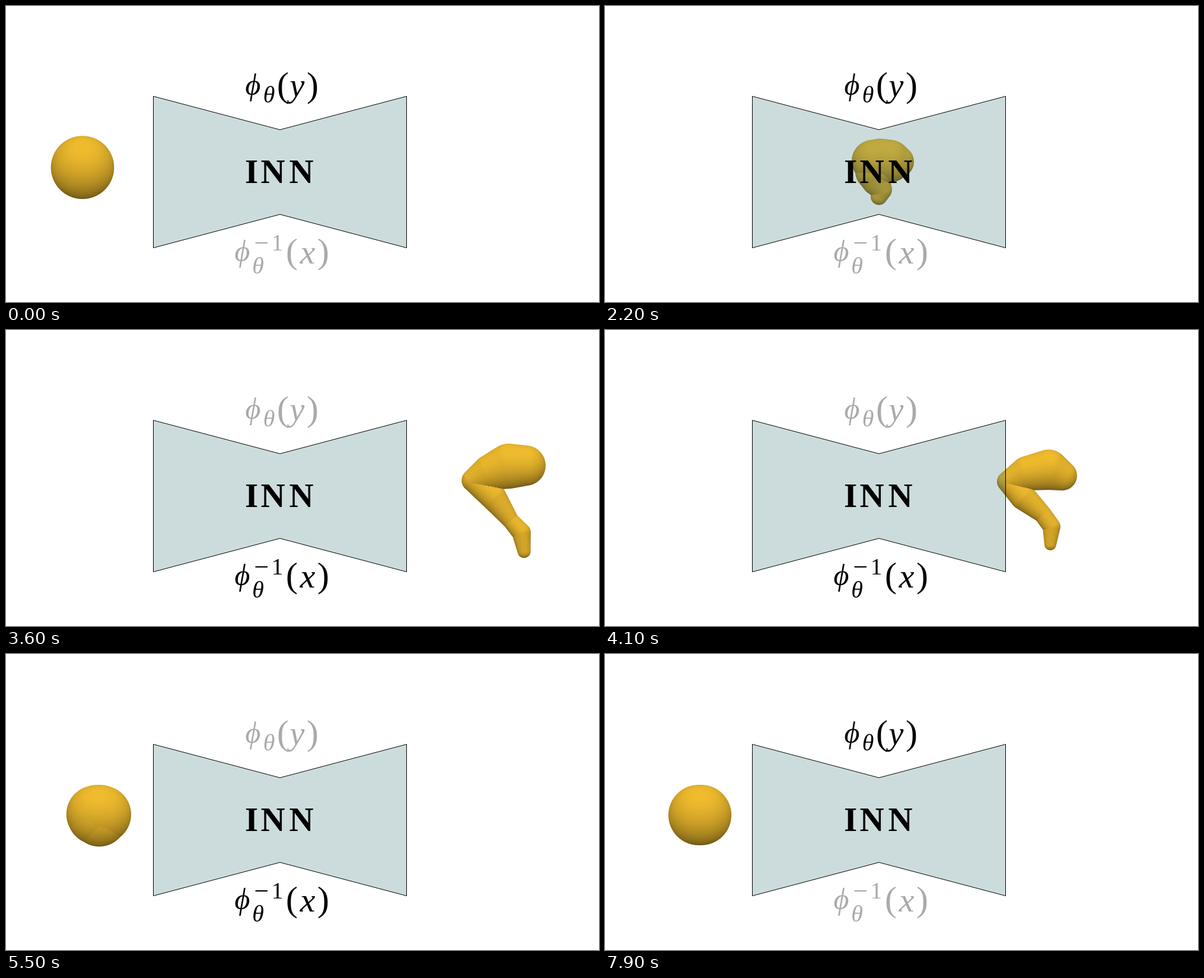
An HTML page with a canvas that plays this animation: 1000 px wide and 500 px high, repeating every 8000 ms.

```html
<!DOCTYPE html>
<html lang="en">
<head>
<meta charset="utf-8">
<title>Invertible network</title>
<style>
  html, body { margin: 0; width: 100%; height: 100%; overflow: hidden; background: #fff; }
  canvas, svg { position: absolute; left: 0; top: 0; width: 1000px; height: 500px; }
  text { font-family: "Liberation Serif", "DejaVu Serif", serif; text-anchor: middle; }
  .it { font-style: italic; }
  .name { font-weight: bold; font-size: 57px; }
</style>
</head>
<body>
<canvas id="stage" width="1000" height="500"></canvas>
<svg viewBox="0 0 1000 500">
  <path d="M248.5 152.5L462 209L675.5 152.5V408.5L462 352L248.5 408.5Z"
        fill="rgb(55,115,115)" fill-opacity=".25" stroke="#000" stroke-width="1"/>
  <g class="name">
    <text x="414" y="299">I</text>
    <text x="450" y="299">N</text>
    <text x="498" y="299">N</text>
  </g>
  <g id="forward">
    <text class="it" x="416.5" y="150" font-size="50">ϕ</text>
    <text class="it" x="443.5" y="163" font-size="40">θ</text>
    <text x="467" y="153" font-size="60">(</text>
    <text class="it" x="491" y="153" font-size="56">y</text>
    <text x="517" y="153" font-size="60">)</text>
  </g>
  <g id="inverse">
    <text class="it" x="398.5" y="431" font-size="50">ϕ</text>
    <text class="it" x="425" y="452" font-size="40">θ</text>
    <text x="431" y="415" font-size="44">−</text>
    <text x="457.5" y="413" font-size="39">1</text>
    <text x="482" y="434" font-size="60">(</text>
    <text class="it" x="508.5" y="435" font-size="58">x</text>
    <text x="535" y="434" font-size="60">)</text>
  </g>
</svg>
<script>
const LOOP = 8000, CYCLE = 6500, STEP = 100;
const SIZE = 260, TOP = 150, PER_BONE = 16;

// A pose is a chain of eight joints [x from centre, y, radius]: hip to toe.
const chain = (cx, list) =>
  Array.from({ length: 8 }, (_, i) => [list[3 * i] - cx, list[3 * i + 1], list[3 * i + 2]]);

const ball = Array.from({ length: 8 }, () => [0, 272.7, 53.3]);
const squashed = ball.map((_, i) => [(i - 3.5) * 0.6, 272, 51]);
const budding = chain(468, [
  452, 262, 36, 464, 260, 36, 480, 262, 36, 494, 263, 27,
  452, 280, 30, 457, 296, 24, 466, 310, 18, 462, 322, 14]);
const leg = chain(823, [
  774, 229, 34, 810, 230, 38, 850, 240, 30, 888, 254, 19,
  843, 283, 22, 806, 322, 14, 783, 342, 16, 777, 374, 11]);
const turned = leg.map(([x, y, r]) => [-x, y, r]);
const shrinking = chain(729, [
  771, 246, 25, 748, 236, 34, 712, 242, 29, 678, 256, 17,
  705, 282, 22, 738, 311, 15, 753, 332, 15, 751, 362, 10]);
const folding = chain(331, [
  356, 266, 34, 340, 264, 38, 322, 264, 38, 307, 264, 34,
  312, 275, 34, 326, 287, 29, 335, 297, 26, 334, 305, 18]);

const path = [
  [0, 129], [1000, 129], [1400, 160], [1700, 268], [2200, 468], [2600, 665],
  [3100, 823], [3400, 835], [3650, 838], [4100, 729], [4900, 331], [5300, 198],
  [5750, 129], [CYCLE, 129]];
const poses = [
  [0, ball], [1000, ball], [1400, squashed], [2200, budding], [3100, leg], [3200, leg],
  [3650, turned], [4100, shrinking], [4900, folding], [5700, ball], [CYCLE, ball]];

const mix = (a, b, u) => a + (b - a) * u;
const segment = (keys, t) => {
  let i = 0;
  while (i < keys.length - 2 && t >= keys[i + 1][0]) i++;
  return [i, (t - keys[i][0]) / (keys[i + 1][0] - keys[i][0])];
};

// Monotone cubic through the path keys.
const rate = i => (path[i + 1][1] - path[i][1]) / (path[i + 1][0] - path[i][0]);
const slope = i => {
  if (i === 0 || i === path.length - 1) return 0;
  const a = rate(i - 1), b = rate(i);
  return a * b <= 0 ? 0 : 2 * a * b / (a + b);
};
function centreAt(t) {
  const [i, u] = segment(path, t);
  const d = path[i + 1][0] - path[i][0], v = 1 - u;
  return path[i][1] * (1 + 2 * u) * v * v + path[i + 1][1] * u * u * (3 - 2 * u)
    + d * (slope(i) * u * v * v - slope(i + 1) * u * u * v);
}

function poseAt(t) {
  const [i, u] = segment(poses, t);
  const a = poses[i][1], b = poses[i + 1][1];
  return a.map((joint, j) => joint.map((v, k) => mix(v, b[j][k], u)));
}

const ctx = document.getElementById("stage").getContext("2d");
const image = ctx.createImageData(SIZE, SIZE);
const depth = new Float32Array(SIZE * SIZE);
const light = [-0.66, 0.75];

function stamp(cx, cy, r) {
  const x0 = Math.max(0, Math.floor(cx - r)), x1 = Math.min(SIZE - 1, Math.ceil(cx + r));
  const y0 = Math.max(0, Math.floor(cy - r)), y1 = Math.min(SIZE - 1, Math.ceil(cy + r));
  for (let y = y0; y <= y1; y++) {
    for (let x = x0; x <= x1; x++) {
      const dx = x + 0.5 - cx, dy = y + 0.5 - cy;
      const dist = Math.sqrt(dx * dx + dy * dy);
      const cover = Math.min(1, r - dist + 0.5);
      if (cover <= 0) continue;
      const p = y * SIZE + x, o = p * 4;
      const z = Math.sqrt(Math.max(0, r * r - dist * dist));
      const alpha = Math.max(image.data[o + 3], cover * 255);
      if (z + cover > depth[p]) {
        depth[p] = z + cover;
        const k = 0.65 + 0.35 * (light[0] * dy + light[1] * z) / r;
        image.data[o] = 240 * k;
        image.data[o + 1] = 188 * k;
        image.data[o + 2] = 46 * k;
      }
      image.data[o + 3] = alpha;
    }
  }
}

function drawBody(t) {
  const cx = centreAt(t), left = Math.round(cx) - SIZE / 2;
  const joints = poseAt(t);
  image.data.fill(0);
  depth.fill(0);
  for (let j = 0; j < joints.length - 1; j++) {
    for (let n = 0; n <= PER_BONE; n++) {
      const [x, y, r] = joints[j].map((v, k) => mix(v, joints[j + 1][k], n / PER_BONE));
      stamp(cx + x - left, y - TOP, r);
    }
  }
  ctx.clearRect(0, 0, 1000, 500);
  ctx.putImageData(image, left, TOP);
}

const forward = document.getElementById("forward");
const inverse = document.getElementById("inverse");
let shown = -1;

function frame() {
  const step = Math.floor(performance.now() % LOOP / STEP) * STEP;
  if (step !== shown) {
    shown = step;
    const t = step % CYCLE;
    const ahead = t < 3600 || t >= 6400;
    forward.setAttribute("fill", ahead ? "#000" : "#aaa");
    inverse.setAttribute("fill", ahead ? "#aaa" : "#000");
    drawBody(t);
  }
  requestAnimationFrame(frame);
}
frame();
</script>
</body>
</html>
```
